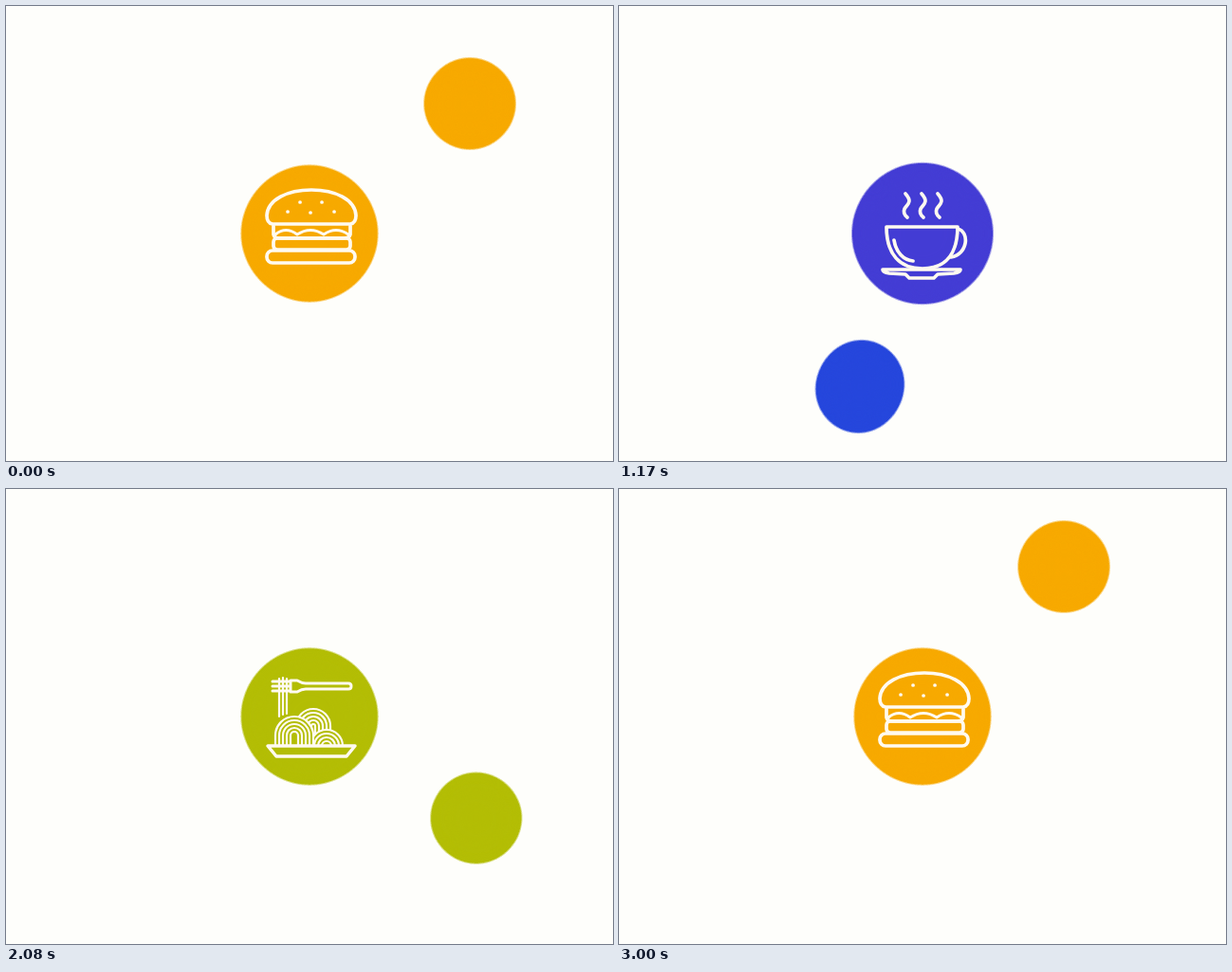
An HTML page for the animation above (3.08 s loop, 640 by 480 pixels).

```html
<!DOCTYPE html>
<html lang="en">
<head>
<meta charset="utf-8">
<title>Menu blobs</title>
<style>
  html, body { margin: 0; width: 100%; height: 100%; overflow: hidden; background: #fefefb; }
  svg { display: block; width: 100%; height: 100%; }
  .icon { fill: none; stroke: #fffaf0; stroke-width: 3.7; stroke-linecap: round; stroke-linejoin: round; }
  .thin { stroke-width: 2.2; }
</style>
</head>
<body>
<svg viewBox="0 0 640 480">
  <defs>
    <filter id="goo" filterUnits="userSpaceOnUse" x="-80" y="-80" width="800" height="640" color-interpolation-filters="sRGB">
      <feGaussianBlur stdDeviation="20"/>
      <feColorMatrix values="1 0 0 0 0  0 1 0 0 0  0 0 1 0 0  0 0 0 26 -9.9"/>
    </filter>
  </defs>

  <g id="blobs" filter="url(#goo)" stroke-linecap="round">
    <line class="ball"/><line class="ball"/><line class="ball"/><line class="ball"/>
    <circle id="hub" cx="320" cy="240"/>
  </g>

  <!-- burger -->
  <g class="icon">
    <path d="M281 230Q275 229 275 221C276 204 297 194 322 194S368 204 369 221Q369 229 363 230Z"/>
    <path d="M282 232V241Q283 245 288 245H356Q362 245 363 241V232"/>
    <path stroke-width="3" d="M284 241Q295 232 307 241Q321 232 335 241Q348 232 361 241"/>
    <rect x="282" y="245" width="81" height="12" rx="4"/>
    <rect x="275" y="258" width="93" height="13" rx="6"/>
    <path d="M310 207h.1M333 207h.1M297 217h.1M321 218h.1M346 217h.1"/>
  </g>

  <!-- cold drink -->
  <g class="icon">
    <path d="M285 195H303L308 221M292 222H345L339 289H300ZM294 236H343"/>
    <rect x="307" y="248" width="11" height="10"/>
    <rect x="321" y="264" width="10" height="10" transform="rotate(35 326 269)"/>
    <path d="M328 221A17 17 0 1 1 345 238"/>
    <path stroke-width="3" d="M345 221V206M345 221L334 210M345 221L356 210M345 221H360M345 221L356 232"/>
  </g>

  <!-- coffee -->
  <g class="icon" stroke-width="3.5">
    <path d="M302 198c8 9 2 11-1 16q-2 5 3 9M319 198c8 9 2 11-1 16q-2 5 3 9M336 198c8 9 2 11-1 16q-2 5 3 9"/>
    <path d="M282 233H357C357 262 344 277 320 277S282 262 282 233Z"/>
    <path d="M290 247C292 260 300 268 310 269M357 235C370 238 368 262 350 265"/>
    <path d="M278 278H360Q360 281 353 282L336 283L332 287H306L302 283L285 282Q278 281 278 278Z"/>
  </g>

  <!-- pasta -->
  <g class="icon thin">
    <path stroke-width="3" d="M281 203H300M281 208H300M281 213H300M300 202H307Q312 205 316 205H361Q364 205 364 208T361 211H316Q312 211 307 214H300Z"/>
    <path d="M288 200V240M292 199V238M296 200V237"/>
    <g id="noodles"></g>
    <path stroke-width="3.5" d="M276 271H368L359 282H285Z"/>
  </g>
</svg>

<script>
const LOOP = 3080, FRAMES = 37, TURN = LOOP / 4, STEP = LOOP / FRAMES;
const CX = 320, CY = 240;
const COLORS = [[247, 169, 0], [251, 0, 160], [37, 70, 220], [179, 189, 4]];

const balls = document.querySelectorAll('.ball');
const icons = document.querySelectorAll('svg > .icon');
const hub = document.getElementById('hub');

const clamp = v => Math.min(1, Math.max(0, v));
const mix = (a, b, k) => a.map((v, i) => v + (b[i] - v) * k);
const rgb = c => `rgb(${c.map(Math.round)})`;
const set = (el, attrs) => { for (const k in attrs) el.setAttribute(k, attrs[k]); };

// Each mound of pasta is a set of nested arches that hides what lies behind.
function mound(x, y, r) {
  let d = '';
  for (let q = r; q > 1; q -= 4) d += `M${x - q} 270V${y}A${q} ${q} 0 0 1 ${x + q} ${y}V270`;
  return `<path fill="${rgb(COLORS[3])}" d="${d}"/>`;
}
document.getElementById('noodles').innerHTML =
  mound(324, 250, 18) + mound(338, 271, 17) + mound(304, 260, 20);

function drawBall(el, i, t) {
  // u is the time from the far point of this ball's trip
  let u = (t + 35 - i * TURN + LOOP) % LOOP;
  if (u > LOOP / 2) u -= LOOP;
  const inward = u > 0;
  const x = Math.abs(u) / (inward ? 396 : 411);
  el.style.display = x < 1 ? '' : 'none';
  if (x >= 1) return;

  const r = 218 * (1 - .25 * x * x) * (1 - x ** 24);
  const swing = u * (.098 - .000066 * Math.abs(u)) * (inward ? .92 : 1);
  const a = (-42.1 - 90 * i + swing) * Math.PI / 180;
  // the ball thins while it tears away from the hub
  const radius = 47.5 - 12 * Math.exp(-(((r - 138) / 36) ** 2));
  const tail = Math.max(0, r - (inward ? 42 : 28) * clamp((200 - r) / 65));
  set(el, {
    x1: CX + tail * Math.cos(a), y1: CY + tail * Math.sin(a),
    x2: CX + r * Math.cos(a) + .01, y2: CY + r * Math.sin(a),
    'stroke-width': radius * 2,
    stroke: rgb(COLORS[i])
  });
}

function draw(t) {
  const turn = Math.floor(t / TURN), p = t % TURN, next = (turn + 1) % 4;
  const color = mix(COLORS[turn], COLORS[next], clamp((p - 245) / 175));
  const bump = Math.exp(-(((p - 345) / 60) ** 2));
  set(hub, { r: 69.8 + 4.5 * bump, fill: rgb(color) });
  balls.forEach((el, i) => drawBall(el, i, t));

  const fade = clamp((p - 338) / 38);
  icons.forEach((el, i) => {
    el.style.opacity = i === turn ? 1 - fade : i === next ? fade : 0;
  });
}

const start = performance.now();
function tick() {
  const now = performance.now() - start;
  draw(Math.floor((now + 5) / STEP) % FRAMES * STEP);
  requestAnimationFrame(tick);
}
tick();
</script>
</body>
</html>
```
